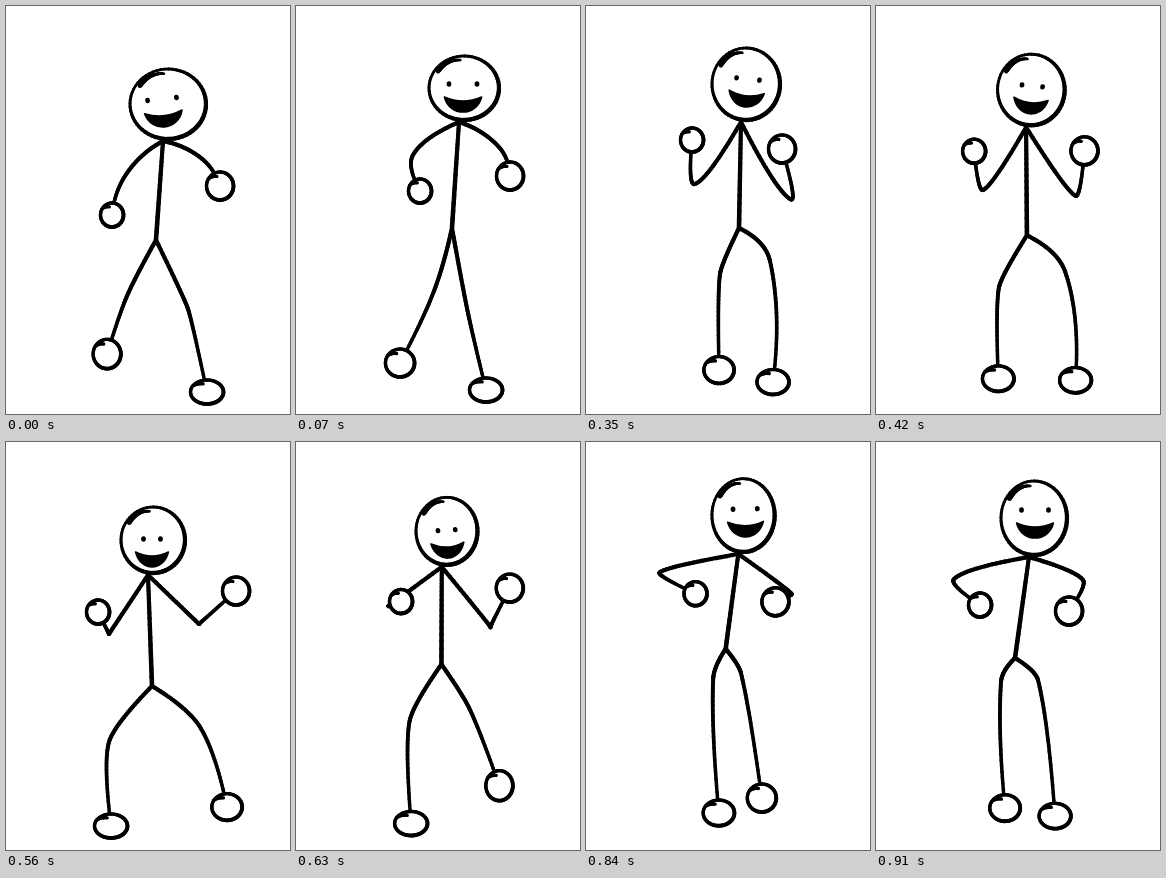
Write an HTML page with a canvas that moves like this. It is 284x408 px and loops after 0.98 s.

```html
<!DOCTYPE html>
<html lang="en">
<head>
<meta charset="utf-8">
<title>Dancing stick figure</title>
<style>
  html, body { margin: 0; width: 100%; height: 100%; overflow: hidden; background: #fff; }
  canvas { display: block; }
</style>
</head>
<body>
<canvas id="stage" width="284" height="408"></canvas>
<script>
const ctx = document.getElementById('stage').getContext('2d');
const STEP = 70, STEPS = 14;

// Dance poses at drawing steps of the loop; everything else follows from the rig.
// head: centre, radii          face: offset from head, eye gap, tilt
// limbs: joint, end, roundness of the joint
const poses = [
  { step: 0, head: [162,98, 40,37], face: [-6,-5, 29, -.1], hip: [150,234],
    armL: [121,167, 106,209, 1], armR: [195,152, 214,180, 1],
    legL: [121,290, 101,348, .6], legR: [182,303, 201,386, .3] },
  { step: 1, head: [168,82, 37,34], face: [-1,-4, 28, 0], hip: [156,222],
    armL: [117,149, 124,185, .7], armR: [202,140, 214,170, 1],
    legL: [138,285, 104,357, .8], legR: [172,307, 190,384, .6] },
  { step: 3, head: [166,92, 35,32], face: [0,-4, 28, -.14], hip: [153,236],
    armL: [120,187, 134,142, 0], armR: [213,190, 190,145, 1],
    legL: [140,250, 147,339, .8], legR: [178,250, 182,377, .8] },
  { step: 5, head: [160,78, 36,38], face: [2,-5, 23, .1], hip: [153,222],
    armL: [109,178, 106,134, .35], armR: [204,193, 196,143, .4],
    legL: [134,268, 133,364, .4], legR: [184,255, 187,376, .9] },
  { step: 8, head: [147,98, 34,35], face: [-1,-1, 17, 0], hip: [146,244],
    armL: [103,192, 92,170, 0], armR: [193,182, 230,149, 0],
    legL: [103,300, 105,384, .5], legR: [194,285, 221,365, .7] },
  { step: 10, head: [156,78, 32,37], face: [1,-2, 19, -.1], hip: [145,200],
    armL: [82,135, 118,147, 0], armR: [198,185, 194,145, 0],
    legL: [127,254, 128,376, .5], legR: [153,245, 182,328, .5] },
  { step: 13, head: [158,76, 35,39], face: [1,-8, 27, 0], hip: [139,216],
    armL: [78,137, 104,163, .4], armR: [207,138, 193,169, .4],
    legL: [125,240, 129,366, .8], legR: [162,238, 179,374, .6] },
];

// Pose by index, wrapping around the loop in both directions.
function keyAt(i) {
  const n = poses.length, turn = Math.floor(i / n), pose = poses[i - turn * n];
  return { pose, at: pose.step + turn * STEPS };
}

// Smooth motion through the poses.
function poseAt(step) {
  let i = poses.length - 1;
  while (poses[i].step > step) i--;
  const [k0, k1, k2, k3] = [i - 1, i, i + 1, i + 2].map(keyAt);
  const span = k2.at - k1.at, u = (step - k1.at) / span;
  const u2 = u * u, u3 = u2 * u;
  const result = {};
  for (const part in k1.pose) {
    if (part === 'step') continue;
    result[part] = k1.pose[part].map((a, j) => {
      const b = k2.pose[part][j];
      const slopeA = (b - k0.pose[part][j]) / (k2.at - k0.at);
      const slopeB = (k3.pose[part][j] - a) / (k3.at - k1.at);
      return (2 * u3 - 3 * u2 + 1) * a + (u3 - 2 * u2 + u) * span * slopeA
        + (3 * u2 - 2 * u3) * b + (u3 - u2) * span * slopeB;
    });
  }
  return result;
}

// Ink line through point(t), t from 0 to 1, with width(t).
function brush(point, width, count = 24) {
  let last = point(0);
  for (let i = 1; i <= count; i++) {
    const next = point(i / count);
    ctx.lineWidth = width(i / count);
    ctx.beginPath();
    ctx.moveTo(...last);
    ctx.lineTo(...next);
    ctx.stroke();
    last = next;
  }
}

function curve(a, c, b, w0, w1) {
  brush(t => [0, 1].map(k => (1 - t) ** 2 * a[k] + 2 * t * (1 - t) * c[k] + t * t * b[k]),
    t => w0 + (w1 - w0) * t);
}

// Two bones; a round joint bends along the line from start to end.
function limb(start, [jx, jy, ex, ey, round]) {
  const [sx, sy] = start, reach = Math.hypot(ex - sx, ey - sy) || 1;
  const handle = length => [
    jx + (ex - sx) / reach * round * length / 2,
    jy + (ey - sy) / reach * round * length / 2];
  curve(start, handle(-Math.hypot(jx - sx, jy - sy)), [jx, jy], 4.2, 4);
  curve([jx, jy], handle(Math.hypot(ex - jx, ey - jy)), [ex, ey], 4, 3.4);
}

function dot(x, y, rx, ry, color) {
  ctx.fillStyle = color;
  ctx.beginPath();
  ctx.ellipse(x, y, rx, ry, 0, 0, 7);
  ctx.fill();
}

// White disc with an inked rim, heavier at the lower right; the tail curls inwards.
function ring(x, y, rx, ry, heavy, tail = 0) {
  dot(x, y, rx, ry, '#fff');
  const from = -2.6, sweep = 2 * Math.PI + tail;
  brush(t => {
    const angle = from + sweep * t;
    const size = 1 - 0.4 * Math.max(0, sweep * t - 2 * Math.PI);
    return [x + rx * size * Math.cos(angle), y + ry * size * Math.sin(angle)];
  }, t => 3.6 + heavy * Math.cos(from + sweep * t - 0.9), 60);
}

// Feet flatten as they come down to the floor.
function foot([, , x, y]) {
  const lift = Math.min(1, Math.max(0, (382 - y) / 45));
  ring(x, y, 16.5 - 3.5 * lift, 12 + 3.5 * lift, 0.3, 0.7);
}

function head([x, y, rx, ry], [dx, dy, gap, tilt]) {
  ring(x, y, rx - 2, ry - 2, 0.9);
  const onHead = (u, v) => [x + u * rx, y + v * ry];
  curve(onHead(-.7, -.5), onHead(-.45, -.85), onHead(-.1, -.82), 5, 2.5);

  ctx.save();
  ctx.translate(x + dx, y + dy);
  ctx.rotate(tilt);
  for (const side of [-1, 1]) dot(side * gap / 2, 0, 2.4, 2.7, '#000');
  const half = 13 + gap / 5;
  ctx.beginPath();
  ctx.moveTo(-half, 13);
  ctx.quadraticCurveTo(0, 21, half, 13);
  ctx.bezierCurveTo(half - 5, 33, 5 - half, 33, -half, 13);
  ctx.fill();
  ctx.lineWidth = 1.6;
  ctx.stroke();
  ctx.restore();
}

function draw(step) {
  const p = poseAt(step);
  const [hx, hy, , hry] = p.head;
  const neck = [hx - 5, hy + hry];
  ctx.fillStyle = '#fff';
  ctx.fillRect(0, 0, 284, 408);
  ctx.strokeStyle = '#000';
  ctx.lineCap = ctx.lineJoin = 'round';

  curve(neck, neck, p.hip, 3.8, 4.6);
  for (const arm of [p.armL, p.armR]) limb(neck, arm);
  for (const leg of [p.legL, p.legR]) limb(p.hip, leg);
  ring(p.armL[2], p.armL[3], 11.5, 12, 0.3, 0.7);
  ring(p.armR[2], p.armR[3], 13.5, 14, 0.3, 0.7);
  foot(p.legL);
  foot(p.legR);
  head(p.head, p.face);
}

function tick() {
  draw(Math.floor(performance.now() / STEP) % STEPS);
  requestAnimationFrame(tick);
}
tick();
</script>
</body>
</html>
```
